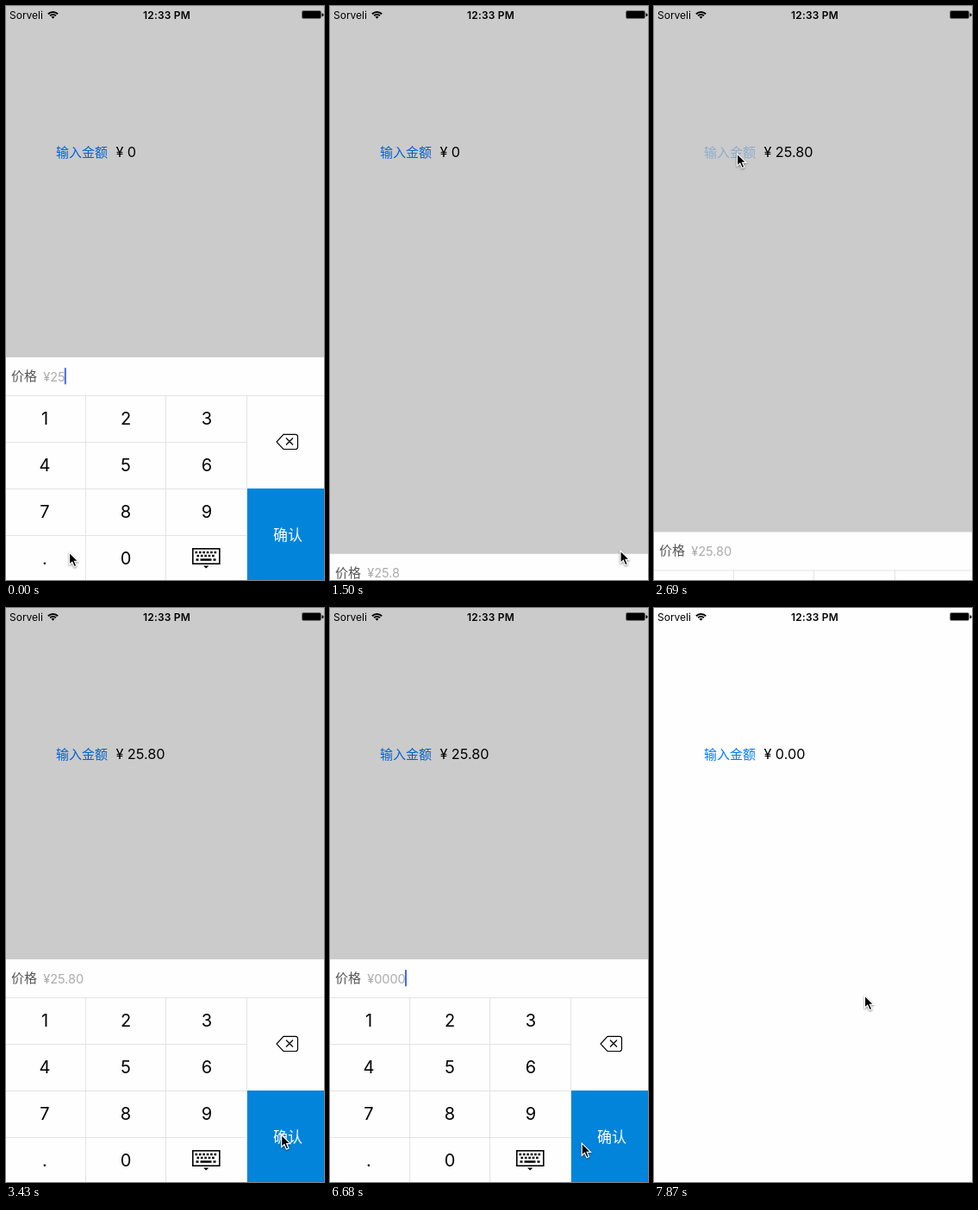
An HTML page for the animation above (8000 ms loop, 369 by 665 pixels).

```html
<!DOCTYPE html>
<html lang="zh">
<head>
<meta charset="utf-8">
<style>
  html, body { margin: 0; width: 100%; height: 100%; overflow: hidden; background: #fefefe; }
  svg { display: block; width: 369px; height: 665px; }
  text { font-family: Inter, "Noto Sans CJK SC", "Noto Sans CJK", sans-serif; white-space: pre; }
  .status { font-size: 12px; }
  .key { font-size: 20px; text-anchor: middle; }
  .amount { font-size: 16.3px; }
  .cjk { font-family: "Noto Sans CJK SC", "Noto Sans CJK", sans-serif; font-size: 15px; }
</style>
</head>
<body>
<svg viewBox="0 0 369 665">
  <rect width="369" height="665" fill="#fefefe"/>
  <text class="status" x="4" y="14.5">Sorveli</text>
  <g fill="none" stroke="#000" stroke-width="2">
    <path d="M48.9 9.2a8 8 0 0 1 11.2 0M51.1 11.3a5 5 0 0 1 6.8 0"/>
    <path d="M54.5 14.8l-1.9-2.1a2.8 2.8 0 0 1 3.8 0z" fill="#000" stroke="none"/>
  </g>
  <text class="status" x="186.5" y="14.5" text-anchor="middle" font-weight="600" letter-spacing=".2">12:33 PM</text>
  <rect x="343.5" y="5.5" width="22" height="9" rx="1.5" fill="none" stroke="#888"/>
  <rect x="344" y="6" width="21" height="8" rx="1"/>
  <path d="M366.5 8.2a2 2 0 0 1 0 4z"/>
  <text class="cjk" id="button" x="58" y="174.8" fill="#007aff">输入金额</text>
  <text class="amount" x="127.6" y="175.2">¥</text>
  <text class="amount" id="amount" x="140.8" y="175.2"></text>
  <rect id="dim" width="369" height="665" opacity=".2"/>

  <g id="sheet">
    <rect width="369" height="262" fill="#fefefe"/>
    <text class="cjk" x="6" y="27" fill="#555">价格</text>
    <text id="price" x="43.2" y="27.7" font-size="14.5" fill="#aaa"></text>
    <rect id="caret" y="12" width="2" height="19.5" rx="1" fill="#4169e1"/>
    <path d="M0 44.5H369M0 98.5H279.5M0 152.5H279.5M0 206.5H279.5M92.5 44V260M185.5 44V260M279.5 44V260" stroke="#e3e3e3"/>
    <g id="keys"></g>
    <g fill="none" stroke="#000" stroke-width="1.2">
      <path d="M322 89.3H336a2.5 2.5 0 0 1 2.5 2.5V104a2.500 2.500 0 0 1-2.500 2.500H322L314 98z"/>
      <path d="M325 93.500l8 8M333 93.500l-8 8"/>
    </g>
    <g fill="none" stroke="#000" stroke-width="2.5">
      <rect x="216.8" y="221.8" width="31" height="17.4" stroke-width="1.6"/>
      <path d="M219.5 226h25M221.5 230h22" stroke-dasharray="2.6 1.8"/>
      <path d="M220.5 234.5h3M225.5 234.5h13M240.5 234.5h3"/>
    </g>
    <path d="M229 241.5h6.4l-3.2 3z"/>
    <rect x="280" y="152" width="89" height="110" fill="#0284db"/>
    <text class="cjk" x="327" y="212.3" text-anchor="middle" fill="#fff" style="font-size:17px">确认</text>
  </g>

  <path id="cursor" d="M0 0V14.2L3.3 11.2L5.7 16.7L8.3 15.6L6 10.3H10.3Z"
    stroke="#fff" stroke-width="1.2" style="filter:drop-shadow(0 1px 1px #0007)"/>
</svg>
<script>
const $ = id => document.getElementById(id);
const LOOP = 8000, STEPS = 54;   // the screen refreshes 54 times per loop
const SLIDE = 2.67;              // sheet travel time, in refresh steps

$('keys').innerHTML = [...'123456789.0'].map((c, i) =>
  `<text class="key" x="${45 + 94 * (i % 3)}" y="${78.2 + 54 * (i / 3 | 0)}">${c}</text>`).join('');

// Cursor stops, in refresh steps; keys are pressed one per step from arrival.
// '<' deletes, '=' confirms, 'o' opens the sheet.
const stop = (arrive, leave, x, y, keys = '') => ({ arrive, leave, x, y, keys });
const stops = [
  stop(0, 0, 73.5, 633),
  stop(2, 3, 45, 633, '.'),
  stop(5, 5, 139, 588, '8'),
  stop(8, 11, 337, 631, '='),
  stop(17, 19, 96.5, 171, 'o'),
  stop(24, 25, 320, 611),
  stop(31, 34, 327.5, 493.5, '<<<<'),
  stop(36, 36, 327.5, 493.5, '<'),
  stop(40, 43, 139, 634, '0000'),
  stop(48, 52, 315, 618, '='),
  stop(53, 53, 244.5, 449),
];

const clamp = x => Math.min(1, Math.max(0, x));
const smooth = x => (x = clamp(x), x * x * (3 - 2 * x));
const flick = x => 1 - (1 - clamp(x)) ** 4;

function cursorAt(n) {
  const i = stops.findLastIndex(s => s.arrive <= n);
  const a = stops[i], b = stops[i + 1] || a;
  const f = b === a ? 0 : flick((n - a.leave) / (b.arrive - a.leave));
  return [a.x + (b.x - a.x) * f, a.y + (b.y - a.y) * f];
}

// Replays every key pressed up to step n.
function stateAt(n) {
  const s = { price: '25', amount: '0', open: true, since: -9 };
  for (const { arrive, keys } of stops) [...keys].forEach((key, i) => {
    const at = arrive + i;
    if (at > n) return;
    if (key === '=' || key === 'o') {
      s.open = key === 'o';
      s.since = at;
      if (key === '=' && n >= at + 3) s.price = s.amount = (+s.price).toFixed(2);
    } else s.price = key === '<' ? s.price.slice(0, -1) : s.price + key;
  });
  return s;
}

function draw(n) {
  const { price, amount, open, since } = stateAt(n), age = n - since;
  const hidden = open ? 1 - smooth((age - .2) / SLIDE) : smooth((age + .1) / SLIDE);
  const show = (id, on) => $(id).style.display = on ? '' : 'none';
  $('sheet').setAttribute('transform', `translate(0 ${407 + 258 * hidden})`);
  show('dim', open ? age >= 1 : age < 3);
  $('button').setAttribute('opacity', open ? .3 + .7 * clamp((age - 1) / 2) : 1);
  $('amount').textContent = amount;
  $('price').textContent = '¥' + price;
  $('caret').setAttribute('x', 42.4 + $('price').getComputedTextLength());
  show('caret', open && age > 6);
  $('cursor').setAttribute('transform', `translate(${cursorAt(n)})`);
}

function tick() {
  draw(Math.floor(performance.now() % LOOP * STEPS / LOOP));
  requestAnimationFrame(tick);
}
tick();
</script>
</body>
</html>
```
